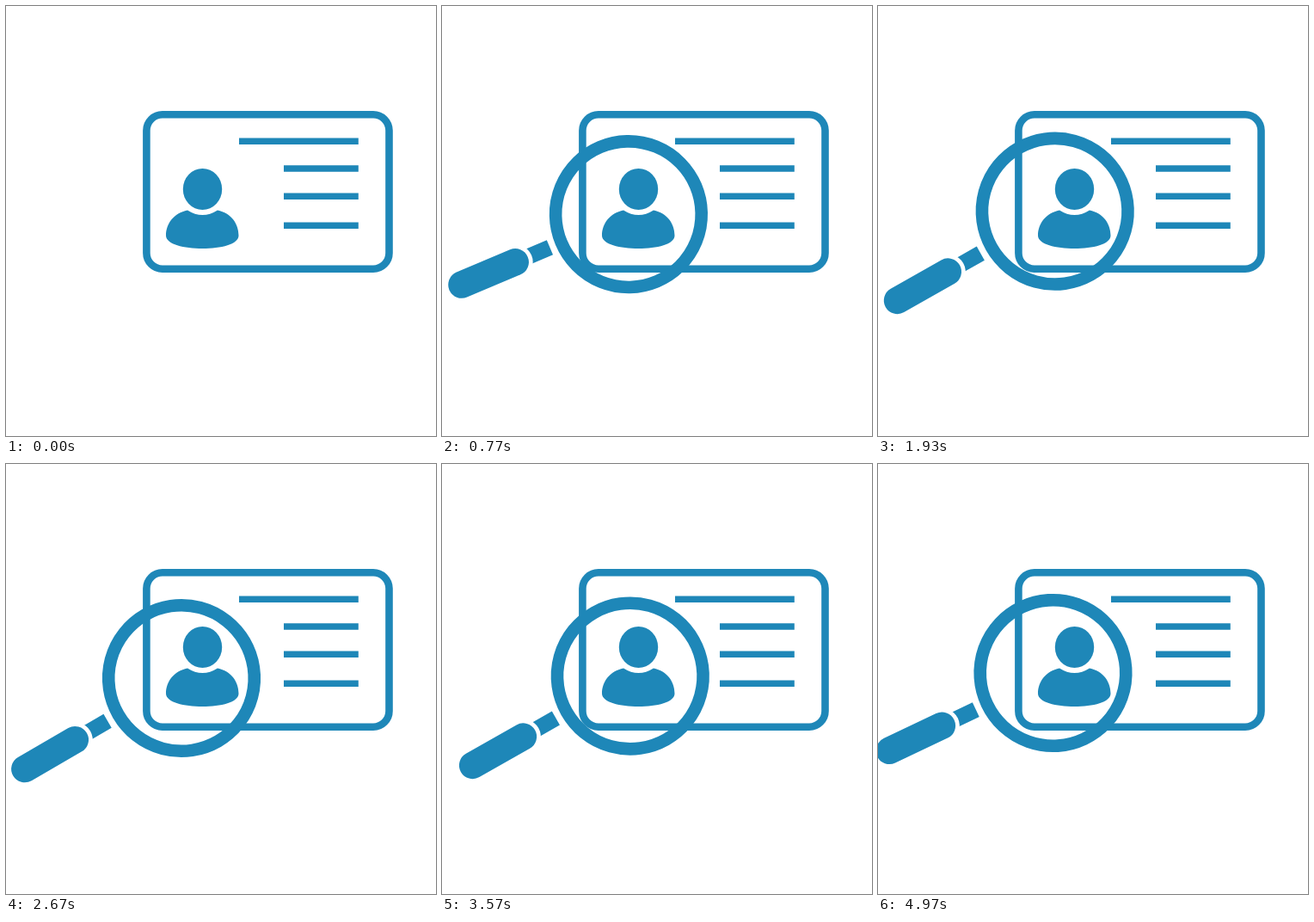
Recreate the animation shown at these times as an HTML page. Size 500 by 500 pixels, loop 5010 ms.

```html
<!DOCTYPE html>
<html lang="en">
<head>
<meta charset="utf-8">
<title>Card search</title>
<style>
  html, body { margin: 0; height: 100%; overflow: hidden; background: #fff; }
  svg { display: block; width: 100vw; height: 100vh; }
</style>
</head>
<body>
<svg viewBox="0 0 500 500" fill="none" stroke="#1e87b8">
  <rect x="163.4" y="126.3" width="282.1" height="179.4" rx="18.5" stroke-width="8.6"/>
  <path d="M271 157.3H409.8M323 189H409.8M323 221.2H409.8M323 255.2H409.8" stroke-width="7.5"/>
  <g fill="#1e87b8" stroke="none">
    <ellipse cx="228.5" cy="213" rx="22.7" ry="24"/>
    <path d="M211 237.5Q228.5 248.5 246 237.5C262 241 270.5 253 270.5 267C270.5 277 250 282 228.5 282S186 277 186 267C186 253 195 241 211 237.5Z"/>
  </g>
  <!-- Lens at the local origin, handle towards -x -->
  <g id="glass">
    <circle r="84.8" stroke-width="14.6"/>
    <path d="M-99.3 0H-130" stroke-width="18.5"/>
    <g stroke-linecap="round">
      <path d="M-143 0H-210" stroke="#fff" stroke-width="41"/>
      <path d="M-143 0H-210.5" stroke-width="31.5"/>
    </g>
  </g>
</svg>
<script>
const LOOP = 5010, APPEAR = 30;
const glass = document.getElementById('glass');

// Turning points of the drift: time, lens x, lens y, handle angle
const keys = [
  [250, 204.5, 244.5, 25.8],
  [530, 222, 241, 24.8],
  [1150, 206.5, 244.5, 20.4],
  [2130, 205.5, 238, 30.6],
  [2670, 204, 249, 30.1],
  [3340, 215.5, 250, 30.3],
  [3850, 221, 242, 27.6],
  [4370, 209, 242, 21.8],
  [4800, 206, 242.7, 22.4],
  [4970, 203.5, 243, 25.4]
];

// Key by index, continued periodically in both directions
function key(i) {
  const n = keys.length, turn = Math.floor(i / n);
  const [t, ...pose] = keys[i - turn * n];
  return [t + turn * LOOP, ...pose];
}

const slope = (i, c) => (key(i + 1)[c] - key(i)[c]) / (key(i + 1)[0] - key(i)[0]);

// Harmonic mean keeps the curve free of overshoot
function tangent(i, c) {
  const a = slope(i - 1, c), b = slope(i, c);
  return a * b > 0 ? 2 * a * b / (a + b) : 0;
}

function poseAt(t) {
  let i = -1;
  while (key(i + 1)[0] <= t) i++;
  const from = key(i), to = key(i + 1), span = to[0] - from[0];
  const u = (t - from[0]) / span, v = 1 - u;
  return [1, 2, 3].map(c =>
    from[c] * v * v * (1 + 2 * u) + to[c] * u * u * (3 - 2 * u) +
    span * u * v * (v * tangent(i, c) - u * tangent(i + 1, c)));
}

const start = performance.now();
function draw() {
  const t = (performance.now() - start) % LOOP;
  const [x, y, angle] = poseAt(t);
  glass.setAttribute('visibility', t < APPEAR ? 'hidden' : 'visible');
  glass.setAttribute('transform', `translate(${x} ${y}) rotate(${-angle})`);
  requestAnimationFrame(draw);
}
draw();
</script>
</body>
</html>
```
